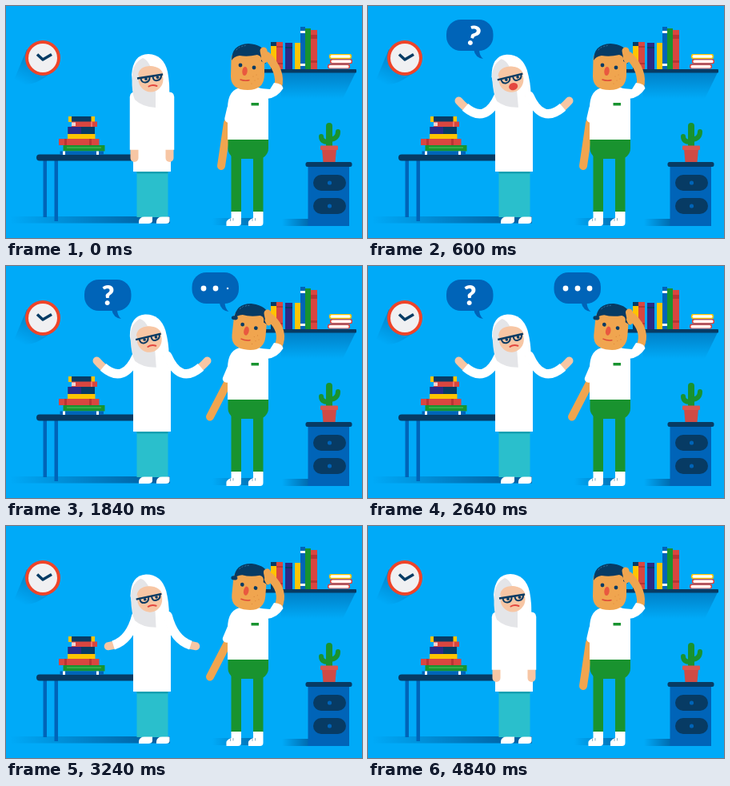
An HTML page with a canvas for the animation above (5320 ms loop, 445 px wide and 290 px high).

```html
<!DOCTYPE html>
<html lang="en">
<head>
<meta charset="utf-8">
<title>Puzzled conversation</title>
<style>
html, body { margin: 0; width: 100%; height: 100%; overflow: hidden; background: #00aaf8; }
canvas { display: block; width: 445px; height: 290px; }
</style>
</head>
<body>
<canvas id="stage"></canvas>
<script>
const W = 445, H = 290, LOOP = 5320, STEP = 40;
const SKY = '#00aaf8', BLUE = '#0064b8', NAVY = '#073b64', RED = '#d94640', GREEN = '#19932f',
  YELLOW = '#ffc400', PURPLE = '#2b2a86', WHITE = '#ffffff', GRAY = '#e4e5e8',
  TEAL = '#2abfcc', PALE = '#f7c6a4', TAN = '#f0a54f';

const canvas = document.getElementById('stage');
const ctx = canvas.getContext('2d');
const dpr = window.devicePixelRatio || 1;
canvas.width = W * dpr;
canvas.height = H * dpr;

const lerp = (a, b, p) => a + (b - a) * p;
const clamp = v => Math.max(0, Math.min(1, v));
const ease = p => p * p * (3 - 2 * p);
const span = (t, a, b) => ease(clamp((t - a) / (b - a)));

// Eased value through [time, value] pairs.
function track(t, keys) {
  let v = keys[0][1];
  for (let i = 1; i < keys.length; i++) {
    v += (keys[i][1] - keys[i - 1][1]) * span(t, keys[i - 1][0], keys[i][0]);
  }
  return v;
}

function box(x, y, w, h, color, r = 0) {
  ctx.fillStyle = color;
  ctx.beginPath();
  ctx.roundRect(x, y, w, h, r);
  ctx.fill();
}
function oval(x, y, rx, ry, color, turn = 0) {
  ctx.fillStyle = color;
  ctx.beginPath();
  ctx.ellipse(x, y, Math.max(0, rx), Math.max(0, ry), turn, 0, Math.PI * 2);
  ctx.fill();
}
function shape(d, color) {
  ctx.fillStyle = color;
  ctx.fill(new Path2D(d));
}
function line(d, color, width, cap = 'round') {
  ctx.strokeStyle = color;
  ctx.lineWidth = width;
  ctx.lineCap = cap;
  ctx.lineJoin = 'round';
  ctx.stroke(new Path2D(d));
}
function fade(x0, y0, x1, y1, strength) {
  const g = ctx.createLinearGradient(x0, y0, x1, y1);
  g.addColorStop(0, 'rgba(0,74,136,0)');
  g.addColorStop(1, `rgba(0,74,136,${strength})`);
  return g;
}
function about(x, y, turn, scale, draw) {
  ctx.save();
  ctx.translate(x, y);
  ctx.rotate(turn * Math.PI / 180);
  ctx.scale(scale, scale);
  ctx.translate(-x, -y);
  draw();
  ctx.restore();
}

function clock() {
  shape('M26 54L8 97Q30 101 44 92L60 82Z', fade(22, 98, 40, 62, .42));
  oval(46, 65, 22, 22, '#ef4429');
  oval(46, 65, 18, 18, '#f0f0f2');
  line('M39 60.5L46 67L57 60.5', NAVY, 3.6, 'butt');
}

function desk() {
  box(5, 263, 200, 8.5, fade(5, 0, 180, 0, .75));
  box(46.5, 190, 4.5, 74, BLUE);
  box(60.5, 190, 4.5, 79, BLUE);
  box(38, 185.5, 140, 8, NAVY, 4);
  box(78, 138, 33, 7, NAVY);
  box(78, 138, 4, 7, YELLOW);
  box(106.5, 138, 4.5, 7, YELLOW);
  box(82, 144.5, 32, 6.5, RED);
  box(82, 145.5, 5, 4.5, '#f3d5d0');
  box(106, 144.5, 2, 6.5, '#ee756c');
  box(77.5, 151, 33.5, 9, NAVY);
  box(77.5, 151, 16.5, 9, PURPLE);
  box(77, 160, 34.5, 6, YELLOW);
  box(66, 166, 50.5, 8, RED);
  box(73, 166, 3, 8, '#b73434');
  box(104, 166, 3, 8, '#b73434');
  box(71.5, 174, 52, 7.5, GREEN);
  box(76, 176, 43, 2, '#36aa48');
  box(67.5, 181.5, 54.5, 4.5, BLUE);
  box(71, 181.5, 3, 4.5, WHITE);
  box(113, 181.5, 3, 4.5, WHITE);
}

function shelf() {
  shape('M338 83H437L420 118H345Z', fade(0, 116, 0, 82, .45));
  box(322, 79, 116, 4.5, NAVY, 1);
  box(331, 45, 7, 34, NAVY);
  box(331, 50, 7, 22, YELLOW);
  box(338, 45, 8, 34, RED);
  box(338, 50, 8, 2, '#b73434');
  box(338, 71, 8, 2, '#b73434');
  box(349, 46, 9, 33, PURPLE);
  box(349, 51, 9, 2, NAVY);
  box(361, 46, 7, 33, YELLOW);
  box(368, 26, 6, 53, BLUE);
  box(368, 31, 6, 3, WHITE);
  box(368, 72, 6, 3, WHITE);
  box(374, 28, 7, 51, GREEN);
  box(381, 30, 8, 49, RED);
  box(381, 36, 8, 5, '#b73434');
  box(381, 68, 8, 3, '#b73434');
  [[404, 60, YELLOW], [405, 66.3, RED], [402, 72.6, RED]].forEach(([x, y, c]) => {
    box(x, y, 28, 6, c, 2);
    box(x + 1.5, y + 1.3, 25, 3.5, WHITE, 1.5);
  });
}

function cabinet() {
  box(345, 266, 33, 9, fade(345, 0, 378, 0, .65));
  box(377.5, 199, 51.5, 76, BLUE);
  box(374.5, 195, 58, 6, NAVY, 2.5);
  [211, 240].forEach(y => {
    box(384, y, 41, 20, NAVY, 10);
    oval(404.5, y + 10, 2.6, 2.6, BLUE);
  });
  line('M404 150V176', GREEN, 8);
  line('M394 163Q394 170 403 170M415 157Q415 166 405 167', GREEN, 6);
  shape('M395 179H413L411.5 195H396.5Z', '#cf4b45');
  box(393, 174.5, 22, 5.5, '#d9564f', 1);
}

function bubble(x, y, grow, content) {
  if (grow <= 0) return;
  ctx.save();
  ctx.globalAlpha = clamp(grow);
  about(x + 59, y + 86, 0, lerp(.45, 1, grow), () => {
    box(x, y, 58.5, 39, BLUE, 18);
    shape(`M${x + 34} ${y + 37}Q${x + 36} ${y + 48} ${x + 46} ${y + 49}Q${x + 41} ${y + 45} ${x + 41} ${y + 37}Z`, BLUE);
    content();
  });
  ctx.restore();
}

function question(t) {
  const age = t - 400;
  const tilt = age > 0 ? 24 * Math.exp(-age / 380) * Math.cos(age / 105 - 1.9) * clamp((1120 - t) / 240) : 0;
  about(127, 50, tilt * 1.3, 1, () => {
    ctx.fillStyle = WHITE;
    ctx.font = '900 34px Lato, sans-serif';
    ctx.textAlign = 'center';
    ctx.fillText('?', 127.5, 48.5);
  });
}

function bubbles(t) {
  const first = track(t, [[200, 0], [480, 1], [2760, 1], [3000, 0]]);
  const second = track(t, [[1020, 0], [1300, 1], [2840, 1], [3080, 0]]);
  bubble(98, 17, first, () => question(t));
  bubble(232.5, 8, second, () => {
    [247, 262, 277].forEach((x, i) => {
      const r = 3.4 * span(t, 1360 + i * 200, 1560 + i * 200);
      oval(x, 28, r, r, WHITE);
    });
  });
}

// Sleeve and hand along a quadratic curve; rest, half and raised poses.
function arm(lift) {
  const poses = [[160.5, 113, 160.5, 150, 160.5, 190], [163, 112, 154, 147, 128, 151], [163.5, 112, 145, 154, 113.5, 118.5]];
  const i = lift < .54 ? 0 : 1;
  const p = i ? (lift - .54) / .46 : lift / .54;
  const [ax, ay, bx, by, cx, cy] = poses[i].map((v, n) => lerp(v, poses[i + 1][n], p));
  const cut = .87;
  const mx = lerp(ax, bx, cut), my = lerp(ay, by, cut);
  const ex = lerp(mx, lerp(bx, cx, cut), cut), ey = lerp(my, lerp(by, cy, cut), cut);
  line(`M${ax} ${ay}Q${bx} ${by} ${cx} ${cy}`, PALE, 10);
  oval(ax, ay, 5.5, 5.5, WHITE);
  line(`M${ax} ${ay}Q${mx} ${my} ${ex} ${ey}`, WHITE, 11.5, 'butt');
}

function womanHead(t) {
  const turn = track(t, [[40, 0], [440, -5], [1240, -5], [1640, -4.2], [2200, -4.6], [2640, -4], [3240, -3], [3600, 0]]);
  const talk = span(t, 240, 400) * (1 - span(t, 1400, 1560));
  about(184, 116, turn, 1, () => {
    shape('M157 86Q159 60 178 60Q197 61 202 82Q205 98 204 112H186L160 106Z', WHITE);
    shape('M171 65Q157 72 157.5 91Q157 108 161 117Q170 126 187 127V104L181 77Q177 67 171 65Z', GRAY);
    oval(181, 91.5, 15.5, 16, PALE);
    shape('M165 87Q166 75 181 75Q195 76 197 87Q188 79 181 79Q171 80 165 87Z', PALE);
    line('M164 90.5L196 85.5', NAVY, 2.4, 'butt');
    line('M168.5 90Q169 96 174.5 95.5Q180 94.5 179.5 88.5M183.5 88Q184 94 189 93Q194.5 92 194 86', NAVY, 2);
    oval(175, 91.3, 1.8, 1.8, NAVY);
    oval(189.5, 89.2, 1.8, 1.8, NAVY);
    if (talk > .2) {
      const open = 3.3 + 1.2 * Math.cos((t - 600) / 64);
      oval(183, 100.5, lerp(4.8, 5.6, (open - 2) / 2.5), open * talk, '#e4473f', -.15);
    } else {
      line('M178.5 100.5Q183 97.8 188.5 100', '#e4473f', 2);
    }
  });
}

function woman(t) {
  const lift = track(t, [[40, 0], [520, 1], [2960, 1], [3560, 0]]);
  box(163.5, 206, 39, 58, TEAL);
  box(163.5, 206, 39, 3.5, '#12a0b2');
  shape('M166 272V269Q167 263.5 173 263.5H183V269Q182 272 178 272Z', WHITE);
  shape('M188 272V269Q189 263.5 195 263.5H204.5V269Q204 272 200 272Z', WHITE);
  box(159, 107, 47, 100, WHITE, [7, 7, 0, 0]);
  arm(lift);
  ctx.save();
  ctx.translate(365, 0);
  ctx.scale(-1, 1);
  arm(lift);
  ctx.restore();
  womanHead(t);
}

function eye(x, y, open) {
  if (open > .6) oval(x, y, 2.4, 2.4 * open, NAVY);
  else line(`M${x - 4} ${y - .8}L${x + 4} ${y + .5}`, NAVY, 1.8 + open);
}

function manHead(t, pose) {
  const nod = .7 * Math.sin(t / 90) * scratch(t);
  const open = track(t, [[1920, 1], [2000, 0], [2040, 0], [2120, 1], [3480, 1], [3590, 0], [4770, 0], [4840, 1]]);
  about(304, 104, pose * 5 + nod, 1, () => {
    shape('M281.5 66Q282 54 302 53Q323 54 323 70V86Q323 105 302 105Q281 105 281 88Z', TAN);
    shape('M282 68Q282 48 303 47Q322 48 325 61V72L319 69Q320 62 314 61Q302 64 292 62Q285 63 282 68Z', NAVY);
    if (pose > .1) oval(282.5, 66.5, 4 * pose, 2.6 * pose, NAVY);
    line('M288 55l1 -1.5M291 52.5l1 -1.2M294.5 50.8l1.4 -.7M298 49.8l1.2 -.3', '#3b7ca5', .8);
    eye(293, 74, open);
    eye(310, 77, open);
    oval(298.5, 81.5, 3.2, 5.6, '#e9583f', .12);
    line('M293 92Q298 94 304 92.7', '#df4a38', 1.5);
    [[309, 88], [313, 86], [311, 93], [307, 97], [315, 91]].forEach(([x, y]) => oval(x, y, .6, .6, '#d9853a'));
  });
}

const scratch = t => span(t, 1100, 1200) * (1 - span(t, 1560, 1700)) + span(t, 2320, 2420) * (1 - span(t, 3260, 3400));

function man(t) {
  const pose = track(t, [[740, 0], [1120, 1], [3360, 1], [3600, 0]]);
  const rub = 1.2 * Math.sin(t / 90) * scratch(t);
  box(258, 265, 62, 9, fade(258, 0, 310, 0, .6));

  line(`M277 146L${lerp(269, 255, pose)} ${lerp(200, 188.5, pose)}`, TAN, 10);
  line(`M281 128L${lerp(278, 275.5, pose)} 141`, WHITE, 9.5);

  box(281.5, 180, 12.5, 78, GREEN);
  box(309, 180, 12.5, 78, GREEN);
  [0, 27.5].forEach(x => {
    shape(`M${281.5 + x} 257H${294 + x}V271Q${294 + x} 275 ${290 + x} 275H${275.5 + x}Q${274 + x} 267 ${281.5 + x} 265Z`, WHITE);
    line(`M${280.5 + x} 266v2.5M${284 + x} 265.5v2.5`, '#85a9bd', 1);
  });
  box(277.5, 166, 50.5, 25, GREEN, [0, 0, 13, 13]);
  shape('M277 167V128Q277 103 296 101.5H312Q328 103 328 118V167Z', WHITE);
  box(306.5, 121, 9.5, 3.5, GREEN);

  manHead(t, pose);

  const hx = lerp(322, 327, pose) + rub * .5, hy = lerp(56, 59, pose) + rub;
  line(`M340 101Q${lerp(345, 349, pose)} 82 ${hx + 4} ${hy + 6}`, TAN, 10);
  line(`M${hx} ${hy}L${hx + 2} ${hy + 10}`, TAN, 9);
  line(`M${hx - 1} ${hy + 9}L${hx + 1} ${hy + 13}`, TAN, 5);
  shape('M318 103L330 104L335 96Q346 97 346.5 103Q339 115 326 116H318Z', WHITE);
}

function draw(now) {
  const t = Math.floor((now % LOOP) / STEP) * STEP;
  ctx.setTransform(dpr, 0, 0, dpr, 0, 0);
  box(0, 0, W, H, SKY);
  clock();
  desk();
  shelf();
  cabinet();
  woman(t);
  bubbles(t);
  man(t);
}

const start = performance.now();
function tick() {
  draw(performance.now() - start);
  requestAnimationFrame(tick);
}
tick();
</script>
</body>
</html>
```
